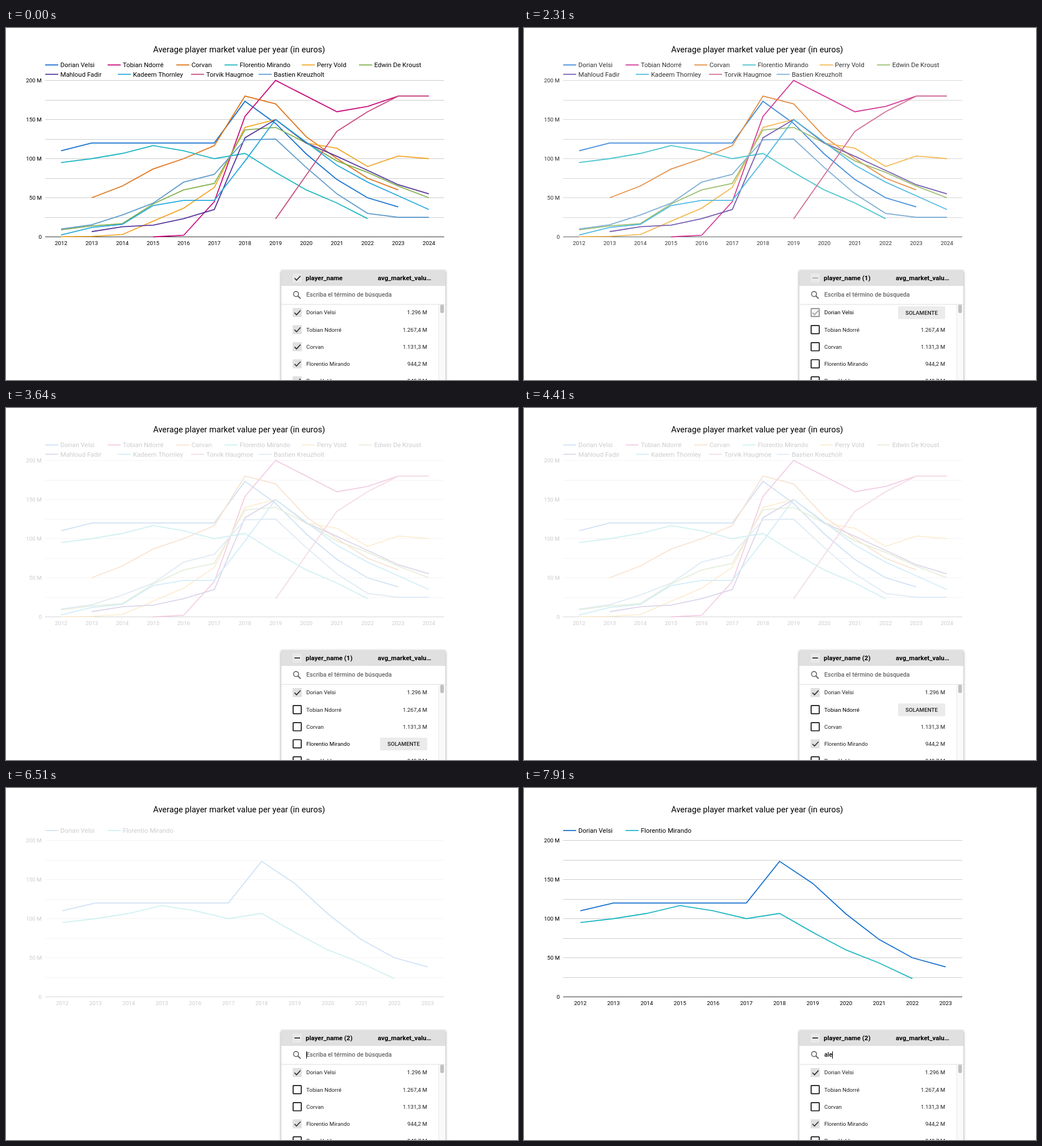
An HTML page that plays this animation: 902x621 px, repeating every 8 s.

```html
<!DOCTYPE html>
<html lang="es">
<head>
<meta charset="utf-8">
<title>Average player market value</title>
<style>
html, body { margin: 0; width: 100%; height: 100%; overflow: hidden; background: #fff; }
svg { display: block; font-family: Roboto, "Open Sans", sans-serif; }
.panel { filter: drop-shadow(0 2px 2.5px rgba(0, 0, 0, .42)); }
</style>
</head>
<body>
<svg id="stage" width="902" height="621" viewBox="0 0 902 621"></svg>
<script>
const LOOP = 8000, STEP = 70;
const stage = document.getElementById('stage');

// name, colour, first year, yearly values in millions
const players = [
  ['Dorian Velsi', '#1470d0', 2012, [110, 120, 120, 120, 120, 120, 173.3, 145, 106, 73.3, 50, 38.3]],
  ['Tobian Ndorré', '#c80a7c', 2015, [0, 2, 45, 154, 200, 180, 160, 166.7, 180, 180]],
  ['Corvan', '#de7418', 2013, [50, 65, 86.7, 100, 116.7, 180, 170, 128, 100, 75, 60]],
  ['Florentio Mirando', '#1fb7c3', 2012, [95, 100, 106.7, 116.7, 110, 100, 106.7, 82.5, 60, 43.3, 23.3]],
  ['Perry Vold', '#f3a72b', 2012, [.3, .7, 3, 20, 36.7, 63.3, 140, 150, 120, 113.3, 90, 103.3, 100]],
  ['Edwin De Kroust', '#82b04c', 2012, [9, 14, 17, 42, 60, 68.3, 136.7, 140, 120, 97, 82.5, 65, 50]],
  ['Mahloud Fadir', '#55359c', 2013, [6.7, 13, 15, 23.3, 35, 126.7, 150, 120, 103, 85, 66.7, 55]],
  ['Kadeem Thornley', '#24a8dd', 2012, [2.5, 12, 16, 40, 46.7, 46.7, 97, 150, 121, 91.7, 70, 52.5, 35]],
  ['Torvik Haugmoe', '#c84a7f', 2019, [23, 79, 135, 160, 180, 180]],
  ['Bastien Kreuzholt', '#619ccb', 2012, [10, 15.5, 28, 43, 70, 80, 124, 125, 88.7, 55, 30, 25, 25]]
];
const totals = ['1.296 M', '1.267,4 M', '1.131,3 M', '944,2 M', '949,7 M'];
const legendX = [69, 179, 300, 385, 521, 622, 69, 197, 326, 445];

// time at which the pointer enters a row (-1: none)
const hovers = [[0, -1], [1680, 0], [2520, 1], [2870, 2], [3360, 1], [3570, 2],
  [3640, 3], [4340, 2], [4410, 1], [5740, 0], [5810, -1]];

const clamp = v => Math.max(0, Math.min(1, v));
const ramp = (t, start, steps) => clamp((t - start + STEP) / (STEP * steps));

const text = (x, y, size, str, attrs = '') =>
  `<text x="${x}" y="${y + size * .355}" font-size="${size}" ${attrs}>${str}</text>`;
const rect = (x, y, w, h, fill, attrs = '') =>
  `<rect x="${x}" y="${y}" width="${w}" height="${h}" fill="${fill}" ${attrs}/>`;
const path = (d, color, width, attrs = '') =>
  `<path d="${d}" fill="none" stroke="${color}" stroke-width="${width}" ${attrs}/>`;

function chart(list, lastYear, legendY) {
  const count = lastYear - 2011, gap = 702 / count;
  const x = year => 70 + gap * (year - 2011.5);
  const y = value => 368.5 - value * 1.38;
  let out = '';
  for (let i = 0; i <= 8; i++) {
    const top = Math.round(92 + 34.5 * i);
    out += rect(69, top, 703, 1, i < 8 ? '#ccc' : '#333');
    if (i % 2 === 0) {
      const value = 200 - 25 * i;
      out += text(63, top + .7, 9.9, value ? value + ' M' : '0', 'text-anchor="end"');
    }
  }
  for (let year = 2012; year <= lastYear; year++)
    out += text(x(year), 379.7, 9.8, year, 'text-anchor="middle"');
  list.forEach(([name, color, first, values], i) => {
    const points = values.map((v, k) => x(first + k) + ' ' + y(v));
    const lx = legendX[i], ly = legendY(i);
    out += path('M' + points.join('L'), color, 1.8);
    out += path(`M${lx} ${ly}h23`, color, 1.8);
    out += text(lx + 26.7, ly + .2, 11.4, name);
  });
  return out;
}

const fullChart = chart(players, 2024, i => i < 6 ? 65.2 : 81.7);
const pairChart = chart([players[0], players[3]], 2023, () => 75);

const tick = (y, color, opacity) =>
  path(`M508.3 ${y + .3}l3.5 3.6 7-7.6`, color, 1.7, `opacity="${opacity}"`);

function checkbox(y, on, color) {
  return `<g opacity="${1 - on}">${rect(505.8, y - 7.2, 14.4, 14.4, '#fff', 'rx="1" stroke="#111" stroke-width="1.7"')}</g>` +
    `<g opacity="${on}">${rect(505, y - 8, 16, 16, '#e0e0e0', 'rx="1"')}</g>` + tick(y, color, on);
}

function row(i, on, hovered) {
  const y = 502 + 30.15 * i;
  const color = hovered ? '#000' : '#212121';
  const right = hovered
    ? rect(659, y - 11, 83, 22.5, '#ebebeb', 'rx="1"') +
      text(700.5, y + .2, 9.8, 'SOLAMENTE', 'text-anchor="middle" font-weight="500" fill="#222"')
    : text(742, y, 9.8, totals[i], `text-anchor="end" fill="${color}"`);
  return checkbox(y, on, hovered ? '#000' : '#333') +
    text(529, y, 9.8, players[i][0], `fill="${color}"`) + right;
}

function search(t) {
  const typed = t < 7630 ? '' : t < 7910 ? 'a' : 'ale';
  const caretX = { '': 529, a: 536, ale: 543 }[typed];
  const caretOn = t >= 6510 && t < 7000 || t >= 7560;
  return '<circle cx="511" cy="469.3" r="4.4" fill="none" stroke="#666" stroke-width="1.6"/>' +
    path('M514 472.5l5 5', '#666', 1.9) +
    text(529, 470.7, 10.7, typed || 'Escriba el término de búsqueda',
      `font-weight="500" fill="${typed ? '#000' : '#666'}"`) +
    (caretOn ? rect(caretX, 464.5, 1, 13, '#000') : '');
}

function panel(t) {
  const all = 1 - ramp(t, 1260, 4);
  const first = ramp(t, 2310, 3), fourth = ramp(t, 4270, 3);
  const hover = hovers.filter(h => h[0] <= t).pop()[1];
  const chosen = t >= 4270 ? ' (2)' : t >= 2310 ? ' (1)' : '';
  let out = `<g class="panel">${rect(485, 427, 289, 220, '#fff', 'rx="1"')}</g>`;
  out += rect(485, 427, 289, 28, '#e0e0e0') + rect(505, 433, 16, 16, '#e9e9e9', 'rx="1"');
  out += tick(441, '#333', all) + path('M508 441h10', '#222', 1.7, `opacity="${first}"`);
  out += text(528, 441, 11.4, 'player_name' + chosen, 'font-weight="700"');
  out += text(655, 441, 11.4, 'avg_market_valu…', 'font-weight="700"');
  out += search(t) + rect(485, 487, 289, 1, '#e0e0e0');
  out += rect(762, 488, 12, 133, '#fafafa') + rect(762, 488, 1, 133, '#e8e8e8');
  out += rect(765, 488, 6.5, 15, '#c1c1c1', 'rx="3"');
  totals.forEach((_, i) => {
    out += row(i, Math.max(all, i === 0 ? first : i === 3 ? fourth : 0), hover === i);
  });
  return out;
}

function draw(t) {
  const pair = t >= 6510;
  const opacity = pair ? .2 + .8 * clamp((t - 6510) / 280) : 1 - .8 * ramp(t, 2310, 4);
  stage.innerHTML =
    text(410.7, 37.5, 14.6, 'Average player market value per year (in euros)', 'text-anchor="middle"') +
    `<g opacity="${opacity}">${pair ? pairChart : fullChart}</g>` + panel(t);
}

const start = performance.now();
let shown = -1;
function frame() {
  const t = Math.floor((performance.now() - start) % LOOP / STEP) * STEP;
  if (t !== shown) draw(shown = t);
  requestAnimationFrame(frame);
}
frame();
</script>
</body>
</html>
```
